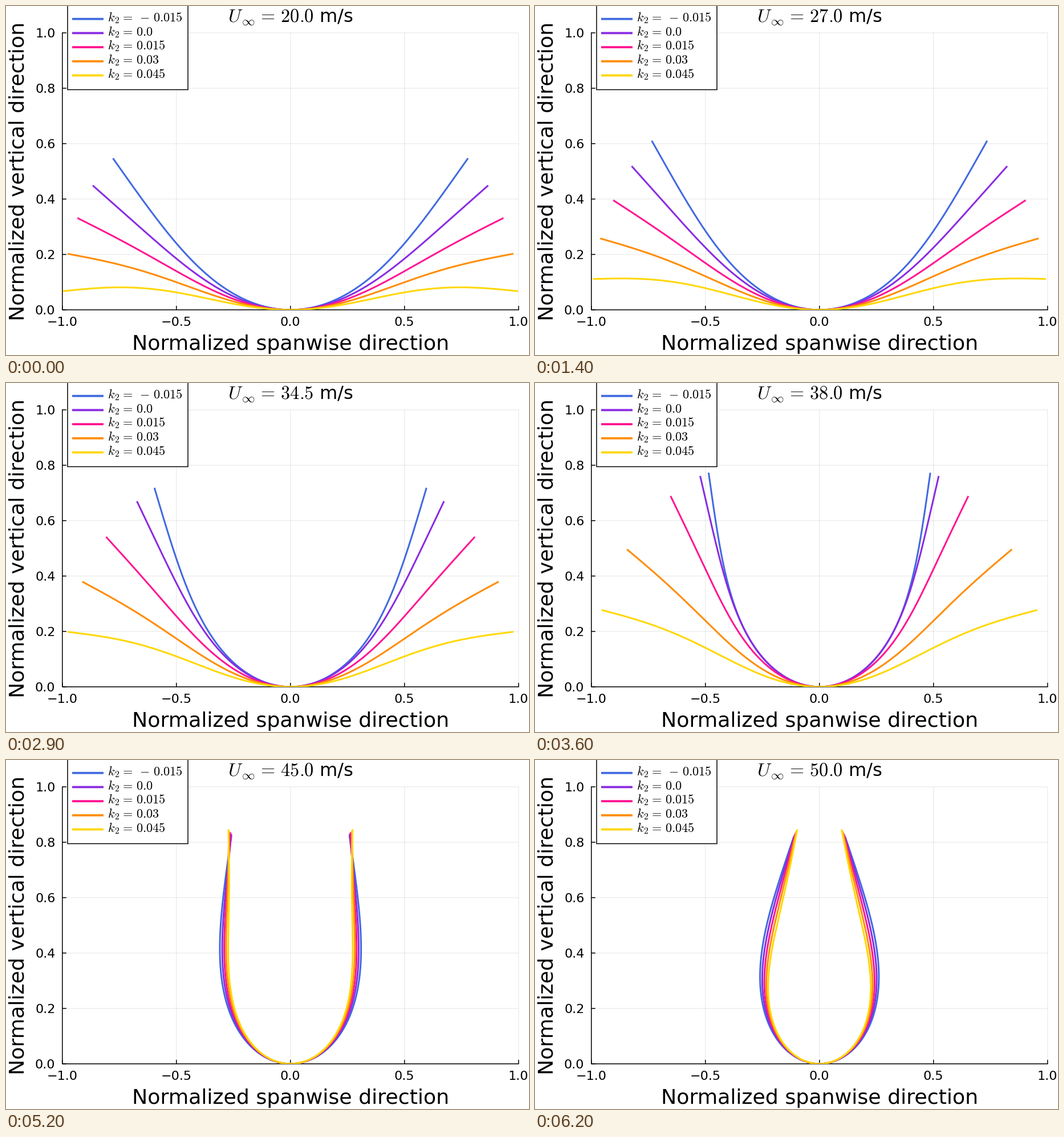
A matplotlib script for the animation above (6.3 s loop, 917 by 611 pixels).

```python
import numpy as np
import matplotlib.pyplot as plt
from matplotlib.animation import FuncAnimation
from matplotlib.patches import Rectangle

W, H, DPI = 917, 611, 64
PT = 72 / DPI                      # points per pixel
LEFT, RIGHT, TOP, BOTTOM = 98.8, 898.7, 47.0, 531.9

plt.rcParams["font.family"] = "DejaVu Sans"
plt.rcParams["mathtext.fontset"] = "cm"

COLORS = ["#4169E1", "#8A2BE2", "#FF1493", "#FF8C00", "#FFD700"]
STIFFNESS = [-0.015, 0.0, 0.015, 0.03, 0.045]

# Airspeed of each step, refined where the last wing snaps upwards
speeds = np.concatenate([np.arange(20, 42.5, 0.5), [42.3, 42.5, 42.7],
                         np.arange(43, 50.5, 0.5)])

S = np.linspace(0, 1, 241)
MODE1 = np.sin(np.pi / 2 * S)
MODE2 = np.sin(3 * np.pi / 2 * S)


def tip_angle(u, k):
    """Direction from root to tip: a growing branch that gives way to a
    raised one, more suddenly the larger k is."""
    q = min(u * u / 2134, 0.9)
    low = (0.41 - 0.115 * q - k * (8.6 - 6.9 * q + 3.1 * q * q)) / (1 - q)
    d = u - 45
    high = 1.26 + 0.036 * d - 0.0003 * d * d + 0.4 * (k + 0.015) * min(d, 1)
    c = k / 0.015
    snap = 36 + 3.7 * c - 0.5 * c * c
    width = 0.02 + 0.55 * (3 - c)
    blend = 0.5 + 0.5 * np.tanh((u - snap) / (2 * width))
    return low + (high - low) * blend


def tip_distance(u, k, angle):
    loss = 0.081 - 0.25 * k + 1.5 * (0.015 - k) * np.exp((20 - u) / 4)
    return 1 - loss * angle ** 2


def beam(a, k):
    """Beam clamped at the root and free at the tip, bent in two modes."""
    slope = a * MODE1 + (0.09 * a + 0.025 + 2.5 * k) * MODE2
    tangent = np.array([np.cos(slope), np.sin(slope)])
    steps = (tangent[:, 1:] + tangent[:, :-1]) / 2 * S[1]
    return np.hstack([np.zeros((2, 1)), np.cumsum(steps, axis=1)])


def wing(u, k):
    angle = tip_angle(u, k)
    a = 1.5 * angle
    for _ in range(12):
        x, y = beam(a, k)[:, -1]
        a += 1.5 * (angle - np.arctan2(y, x))
    curve = beam(a, k)
    return curve * tip_distance(u, k, angle) / np.hypot(*curve[:, -1])


def px(x):
    return (LEFT + RIGHT) / 2 + x * (RIGHT - LEFT) / 2


def py(y):
    return BOTTOM - y * (BOTTOM - TOP)


fig = plt.figure(figsize=(W / DPI, H / DPI), dpi=DPI, facecolor="white")
ax = fig.add_axes([0, 0, 1, 1])
ax.set_xlim(0, W)
ax.set_ylim(H, 0)
ax.axis("off")


def stroke(xs, ys, width, color="black", **kw):
    kw.setdefault("solid_capstyle", "butt")
    return ax.plot(xs, ys, color=color, lw=width * PT, snap=False, **kw)[0]


def label(x, y, text, size, **kw):
    return ax.text(x, y, text, fontsize=size * PT, color="black",
                   va="baseline", **kw)


# Grid, ticks and axes
for v in np.linspace(-1, 1, 5):
    x = px(v)
    stroke([x, x], [TOP, BOTTOM], 1.3, alpha=0.08, zorder=1)
    stroke([x, x], [BOTTOM, BOTTOM - 7], 1.5, zorder=2)
    label(x, 560, f"{v:.1f}".replace("-", "\u2212"), 22.2, ha="center")
for v in np.linspace(0, 1, 6):
    y = py(v)
    stroke([LEFT, RIGHT], [y, y], 1.3, alpha=0.08, zorder=1)
    stroke([LEFT, LEFT + 7], [y, y], 1.5, zorder=2)
    label(86.5, y + 8.1, f"{v:.1f}", 22.2, ha="right")
stroke([LEFT, LEFT, RIGHT], [TOP, BOTTOM, BOTTOM], 1.5, zorder=2,
       solid_capstyle="projecting")

label(498.7, 602, "Normalized spanwise direction", 36.4, ha="center")
label(32, 289.4, "Normalized vertical direction", 36.4, ha="center",
      rotation=90, rotation_mode="anchor")
title = label(498.7, 29, "", 32.3, ha="center")

# Wings and legend
plot_area = Rectangle((LEFT, TOP), RIGHT - LEFT, BOTTOM - TOP,
                      transform=ax.transData)
ax.add_patch(Rectangle((108, -20), 211, 166.5, fc="white", ec="black",
                       lw=1.5 * PT, snap=False, zorder=5))
lines = []
for row, (k, color) in enumerate(zip(STIFFNESS, COLORS)):
    line = stroke([], [], 3, color, zorder=3, solid_joinstyle="round")
    line.set_clip_path(plot_area)
    lines.append(line)
    y = 22.7 + 24.7 * row
    stroke([116, 171], [y, y], 3.8, color, zorder=6)
    sign = r"\hspace{0.33}{-}\hspace{0.33}" if k < 0 else ""
    label(177.5, y + 4.5,
          rf"$k_{{\hspace{{0.08}}2}}\hspace{{0.06}} = \hspace{{0.11}}"
          rf"{sign}{abs(k)}$", 22.2, ha="left", zorder=6)


def update(i):
    for line, k in zip(lines, STIFFNESS):
        x, y = wing(speeds[i], k)
        line.set_data(px(np.concatenate([-x[:0:-1], x])),
                      py(np.concatenate([y[:0:-1], y])))
    title.set_text(rf"$U_{{\hspace{{0.1}}\infty}}\hspace{{0.12}} = "
                   rf"\hspace{{0.15}}{speeds[i]:.1f}$ m/s")
    return lines + [title]


anim = FuncAnimation(fig, update, frames=len(speeds), interval=100,
                     repeat=True, repeat_delay=0)
plt.show()
```
